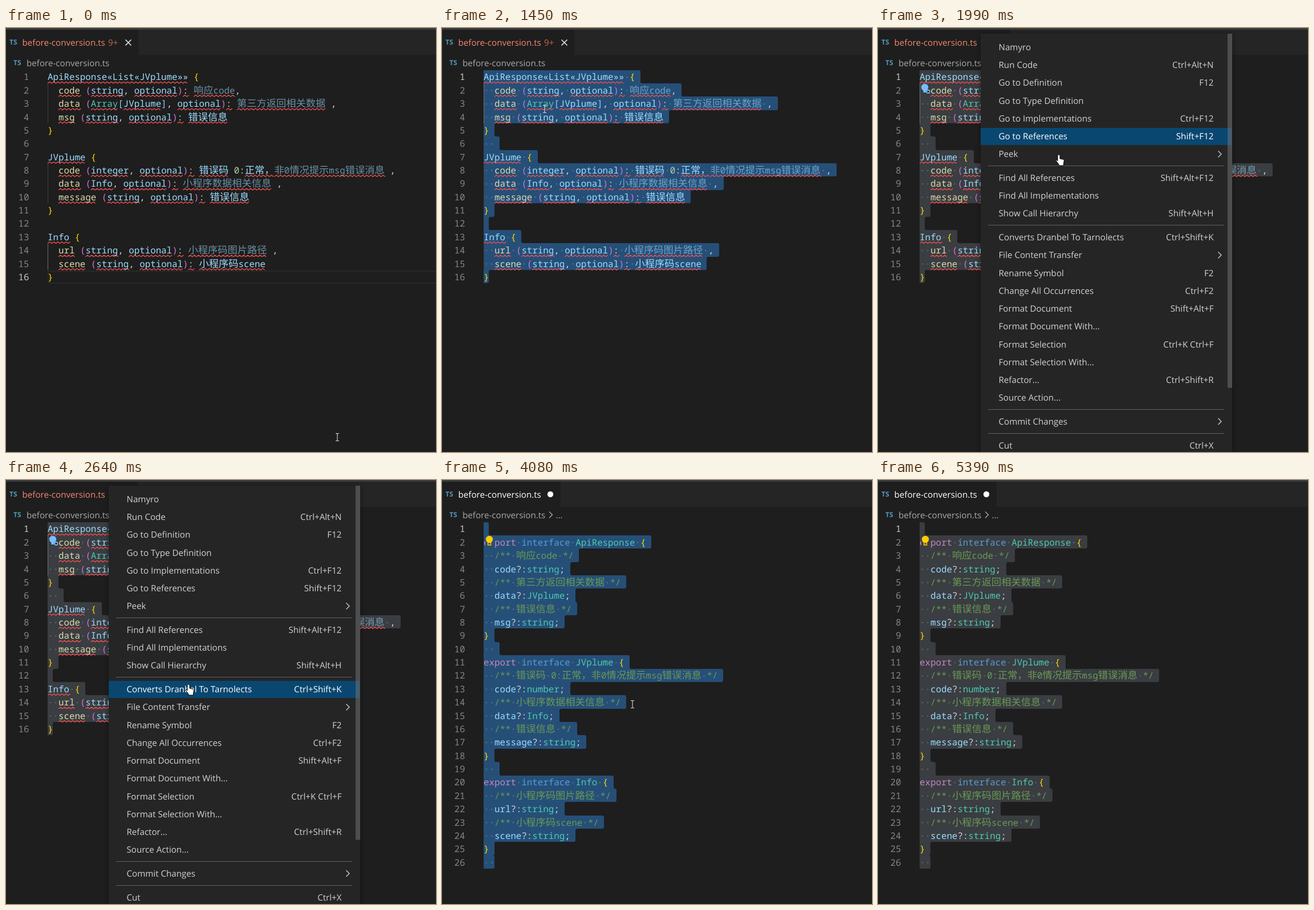
Recreate the animation shown at these times as an HTML page. Size 754 by 743 pixels, loop 5.48 s.

```html
<!DOCTYPE html>
<html lang="en">
<head>
<meta charset="utf-8">
<title>Interface conversion</title>
<style>
  html, body { margin: 0; width: 100%; height: 100%; overflow: hidden; background: #1e1e1e; }
  svg { display: block; width: 754px; height: 743px; --sel: #264f78; }
  text { white-space: pre; text-rendering: geometricPrecision; }
  .ui { font: 15.15px "Open Sans", "Noto Sans", sans-serif; }
  .ts { font: bold 12px "Open Sans", sans-serif; fill: #519aba; }
  .mono { font: 500 15.807px "Noto Sans Mono", "DejaVu Sans Mono", monospace; }
  .cjk { font: 300 17.25px "Noto Sans CJK SC", "Noto Sans CJK", sans-serif; }
  .sel { fill: var(--sel); }
  .menu { filter: drop-shadow(0 2px 5px rgba(0, 0, 0, .4)); }
</style>
</head>
<body>
<svg id="stage" viewBox="0 0 754 743" xmlns="http://www.w3.org/2000/svg"></svg>
<script>
const LOOP = 5480;
const LEFT = 73, TOP = 74, ROW = 23.37, CELL = 9.484, WIDE = 17.25;
const COLORS = {
  w: '#d4d4d4', b: '#9cdcfe', d: 'rgba(156,220,254,.6)', y: '#dcdcaa', p: '#da70d6',
  k: '#87cefa', o: '#ffd700', t: '#4ec9b0', n: '#b5cea8', g: '#6a9955', e: '#c586c0', i: '#569cd6'
};
const stage = document.getElementById('stage');

function add(parent, tag, attrs = {}, text) {
  const el = document.createElementNS('http://www.w3.org/2000/svg', tag);
  for (const key in attrs) el.setAttribute(key, attrs[key]);
  if (text !== undefined) el.textContent = text;
  parent.append(el);
  return el;
}
const group = (parent, attrs) => add(parent, 'g', attrs);
const rect = (parent, x, y, width, height, fill) => add(parent, 'rect', { x, y, width, height, fill });
const label = (parent, x, y, text, fill, cls = 'ui', anchor = 'start') =>
  add(parent, 'text', { x, y, fill, class: cls, 'text-anchor': anchor }, text);
const line = (parent, d, stroke, width = 1.3) =>
  add(parent, 'path', { d, stroke, 'stroke-width': width, fill: 'none' });
const show = (el, on) => { el.style.display = on ? '' : 'none'; };
const rowY = i => Math.floor(TOP + ROW * i);

// Tokens: colour key, "~" for an error underline or a blank, then the text.
const prop = (name, type, ...note) => [
  'w   ', 'y~' + name, 'w  ', 'p (', ...type, 'w ,', 'w  ', 'b~optional', 'p )', 'w~:', 'w  ', ...note
];
const str = ['b~string'];
const before = [
  ['b~ApiResponse«List«JVplume»»', 'w  ', 'o {'],
  prop('code', str, 'd~响应code', 'w ,'),
  prop('data', ['t~Array', 'k [', 'b~JVplume', 'k ]'], 'd~第三方返回相关数据', 'w  ,'),
  prop('msg', str, 'b~错误信息'),
  ['o }'],
  ['w   '],
  ['b~JVplume', 'w  ', 'o {'],
  prop('code', ['b~integer'], 'b~错误码', 'w  ', 'n 0', 'w :', 'b~正常，', 'd~非0情况提示msg错误消息', 'w  ,'),
  prop('data', ['b~Info'], 'd~小程序数据相关信息', 'w  ,'),
  prop('message', str, 'b~错误信息'),
  ['o }'],
  [],
  ['b~Info', 'w  ', 'o {'],
  prop('url', str, 'd~小程序码图片路径', 'w  ,'),
  prop('scene', str, 'b~小程序码scene'),
  ['o }']
];

const head = name => ['e export', 'w  ', 'i interface', 'w  ', 't ' + name, 'w  ', 'o {'];
const field = (note, name, type) => [
  ['g   /** ' + note + ' */'],
  ['w   ', 'b ' + name, 'w ?:', 't ' + type, 'w ;']
];
const after = [
  [],
  head('ApiResponse'),
  ...field('响应code', 'code', 'string'),
  ...field('第三方返回相关数据', 'data', 'JVplume'),
  ...field('错误信息', 'msg', 'string'),
  ['o }'],
  ['w   '],
  head('JVplume'),
  ...field('错误码 0:正常，非0情况提示msg错误消息', 'code', 'number'),
  ...field('小程序数据相关信息', 'data', 'Info'),
  ...field('错误信息', 'message', 'string'),
  ['o }'],
  ['w   '],
  head('Info'),
  ...field('小程序码图片路径', 'url', 'string'),
  ...field('小程序码scene', 'scene', 'string'),
  ['o }'],
  ['w   ']
];

function squiggle(parent, x, y, width) {
  let d = `M${x} ${y}`;
  for (let i = 0; i < Math.round(width / 3.6); i++) d += `l3.6 ${i % 2 ? 2.6 : -2.6}`;
  line(parent, d, '#f14c4c');
}

// Selection row: right corners turn outward or inward to meet the neighbours.
function selectionPath(i, ends) {
  const r = 3, x = ends[i], y0 = rowY(i), y1 = rowY(i + 1);
  const near = j => ends[j] === undefined ? 0 : ends[j];
  const up = x >= near(i - 1) ? 1 : 0, down = x >= near(i + 1) ? 1 : 0;
  return `M${LEFT} ${y0}H${up ? x - r : x + r}A${r} ${r} 0 0 ${up} ${x} ${y0 + r}` +
    `V${y1 - r}A${r} ${r} 0 0 ${down} ${down ? x - r : x + r} ${y1}H${LEFT}Z`;
}

function buildDoc(lines, guides) {
  const root = group(stage), back = group(root), mid = group(root), front = group(root);
  const ends = [], picks = [], numbers = [];
  lines.forEach((tokens, i) => {
    const y = TOP + ROW * i, base = y + 17.4, dots = group(front, { fill: 'rgba(227,228,226,.3)' });
    let x = LEFT;
    for (const token of tokens) {
      const from = x;
      for (const run of token.slice(2).match(/ +|[\u2e80-\uffff]+|[^ \u2e80-\uffff]+/g)) {
        const wide = run.charCodeAt(0) >= 0x2e80;
        if (run[0] === ' ') {
          for (let n = 0; n < run.length; n++)
            add(dots, 'circle', { cx: x + (n + .5) * CELL, cy: y + 12.3, r: 1.1 });
        } else {
          label(front, x, base, run, COLORS[token[0]], wide ? 'cjk' : 'mono');
        }
        x += run.length * (wide ? WIDE : CELL);
      }
      if (token[1] === '~') squiggle(mid, from, y + 22.9, x - from);
    }
    ends.push(Math.round(x + (i < lines.length - 1 ? CELL : 0)));
    picks.push([dots]);
    numbers.push(label(front, 40.5, base, i + 1, '#858585', 'mono', 'end'));
  });
  picks.forEach((p, i) => p.push(add(back, 'path', { d: selectionPath(i, ends), class: 'sel' })));
  const bars = guides.map(([a, b]) => rect(mid, LEFT, rowY(a), 1, rowY(b) - rowY(a), '#404040'));
  return {
    root,
    update(first, active, guide) {
      picks.forEach((p, i) => p.forEach(el => show(el, i >= first)));
      numbers.forEach((n, i) => n.setAttribute('fill', i === active ? '#c6c6c6' : '#858585'));
      bars.forEach((b, i) => b.setAttribute('fill', i === guide ? '#707070' : '#404040'));
    }
  };
}

// Window frame
rect(stage, 0, 0, 754, 743, '#1e1e1e');
rect(stage, 0, 0, 754, 47, '#252526');
const tab = rect(stage, 0, 3, 232, 44, '#1e1e1e');
rect(stage, 0, 0, 754, 3, '#3c3c3c');
label(stage, 6, 29, 'TS', '', 'ts');
label(stage, 13, 65, 'TS', '', 'ts');
const title = label(stage, 28.5, 31, 'before-conversion.ts');
label(stage, 36, 66.5, 'before-conversion.ts', '#a9a9a9');
const clean = group(stage);
label(clean, 179, 31, '9+', '#c4654f');
line(clean, 'M209.5 20.5l10 10m0-10l-10 10', '#e8e8e8', 1.6);
const dirty = add(stage, 'circle', { cx: 190, cy: 25, r: 5.2, fill: '#fff' });
const crumb = group(stage);
line(crumb, 'M188 55.5l5.5 5.5l-5.5 5.5', '#a9a9a9', 1.4);
label(crumb, 199.5, 66.5, '...', '#a9a9a9');

const currentLine = add(stage, 'rect', {
  x: 74, y: rowY(15) + 2, width: 690, height: 21, fill: 'none', stroke: '#282828', 'stroke-width': 2
});
const docs = [
  buildDoc(before, [[1, 4], [7, 10], [13, 15]]),
  buildDoc(after, [])
];
const caret = rect(stage, LEFT, 0, 2, 23, '#aeafad');

// Light bulbs
function bulb(cx, color) {
  const g = group(stage);
  add(g, 'rect', { x: 76, y: 98, width: 15, height: 18, class: 'sel' });
  add(g, 'circle', { cx, cy: 104, r: 6.2, fill: color });
  return g;
}
const blueBulb = bulb(82, '#75beff');
rect(blueBulb, 79.5, 109, 5, 4, '#75beff');
add(blueBulb, 'circle', { cx: 88, cy: 111.5, r: 2.6, fill: '#1e1e1e', stroke: '#75beff', 'stroke-width': 1.6 });
const yellowBulb = bulb(83, '#fc0');
add(yellowBulb, 'rect', { x: 80.5, y: 109.5, width: 5, height: 4.5, fill: '#5c5436', stroke: '#fc0', 'stroke-width': 1.4 });

// Context menu
const ITEM = 31.24, GAP = 10.4;
const ITEMS = [
  'Namyro', 'Run Code|Ctrl+Alt+N', 'Go to Definition|F12', 'Go to Type Definition',
  'Go to Implementations|Ctrl+F12', 'Go to References|Shift+F12', 'Peek|>', '-',
  'Find All References|Shift+Alt+F12', 'Find All Implementations', 'Show Call Hierarchy|Shift+Alt+H', '-',
  'Converts Dranbel To Tarnolects|Ctrl+Shift+K', 'File Content Transfer|>', 'Rename Symbol|F2',
  'Change All Occurrences|Ctrl+F2', 'Format Document|Shift+Alt+F', 'Format Document With...',
  'Format Selection|Ctrl+K Ctrl+F', 'Format Selection With...', 'Refactor...|Ctrl+Shift+R',
  'Source Action...', '-', 'Commit Changes|>', '-', 'Cut|Ctrl+X'
];
const menu = group(stage, { class: 'menu' });
rect(menu, 180, 10, 441, 760, '#252526');
const hoverBar = rect(menu, 180, 0, 440, 30, '#094771');
const entries = [];
let menuY = 18;
for (const item of ITEMS) {
  if (item === '-') {
    rect(menu, 193, Math.round(menuY + 4.5), 414, 1, '#606060');
    menuY += GAP;
    continue;
  }
  const [name, key] = item.split('|'), mid = menuY + 15.6;
  const g = group(menu, { fill: '#d2d2d2' });
  add(g, 'text', { x: 211.5, y: mid + 5.3, class: 'ui' }, name);
  if (key === '>') line(g, `M596.5 ${mid - 5.5}l5.5 5.5l-5.5 5.5`, '#ccc', 1.4);
  else if (key) add(g, 'text', { x: 588.5, y: mid + 5.3, class: 'ui', 'text-anchor': 'end' }, key);
  entries.push({ g, top: menuY });
  menuY += ITEM;
}
rect(menu, 613, 10, 8, 620.5, 'rgba(121,121,121,.5)');

// Pointers
const beam = line(stage, 'M-3-6.5h2l1 1l1-1h2M0-5.5v11M-3 6.5h2l1-1l1 1h2', '#d8d8d8', 1.1);
const hand = add(stage, 'path', {
  d: 'M0 0c1.2 0 2 .8 2 2v5l5.5 1.2c1.4.3 2 1.2 1.8 2.6L8.5 16v3H0v-2l-4.5-6c-.6-1 .6-2.2 1.8-1.4L-2 11V2C-2 .8-1.2 0 0 0z',
  fill: '#fff', stroke: '#000', 'stroke-width': 1
});

// Pointer moves: start, step time, step count, end x, end y
const MOVES = [
  [70, 74, 5, 90, 437], [440, 74, 3, 76, 365],
  [660, 78, 4, 5, 10], [972, 78, 3, 95, 62],
  [1210, 80, 4, 180, 142],
  [1910, 80, 2, 317, 222], [2050, 80, 1, 320, 238],
  [2190, 75, 6, 319, 357], [2640, 80, 1, 320, 358], [2720, 80, 1, 320, 362],
  [2820, 70, 1, 320, 366], [2890, 70, 1, 320, 363],
  [3650, 70, 7, 334, 393],
  [4200, 81, 7, 612, 690], [4780, 73, 4, 680, 755]
];
function pointerAt(t) {
  let x = 581, y = 717;
  for (const [start, step, count, toX, toY] of MOVES) {
    if (t < start) break;
    const part = Math.min(count, Math.floor((t - start) / step) + 1) / count;
    x += (toX - x) * part;
    y += (toY - y) * part;
  }
  return [x, y];
}
function hoverAt(t, y) {
  if (t < 1910) return -1;
  if (t < 1990) return 3;
  if (t < 2050) return 5;
  if (t < 2190) return -1;
  return entries.findIndex(e => y >= e.top && y < e.top + ITEM);
}
const within = (t, a, b) => t >= a && t < b;

function draw(t) {
  const [x, y] = pointerAt(t);
  const converted = t >= 3500, edited = t >= 3650, open = within(t, 1590, 3350);

  let first = 0;
  if (t < 440) first = 99;
  else if (t < 972) first = Math.max(0, Math.floor((y - TOP) / ROW));
  const active = first === 99 ? 15 : first;
  docs.forEach((doc, i) => show(doc.root, converted === (i === 1)));
  if (converted) docs[1].update(0, 0, -1);
  else docs[0].update(first, active, active >= 12 ? 2 : active >= 6 ? 1 : 0);
  show(currentLine, t < 440);
  stage.style.setProperty('--sel', open || t >= 5390 ? '#3a3d41' : '#264f78');

  caret.setAttribute('y', rowY(active));
  show(caret, within(t, 660, 1210) || within(t, 3350, 4000) || within(t, 4500, 5000));
  show(blueBulb, within(t, 1670, 3800));
  show(yellowBulb, t >= 3800);

  tab.setAttribute('width', edited ? 208 : 232);
  title.setAttribute('fill', edited ? '#fff' : '#f48771');
  show(clean, !edited);
  show(dirty, edited);
  show(crumb, t >= 3800);

  show(menu, open);
  const hover = hoverAt(t, y);
  show(hoverBar, hover >= 0);
  if (hover >= 0) hoverBar.setAttribute('y', Math.round(entries[hover].top + .4));
  entries.forEach((e, i) => e.g.setAttribute('fill', i === hover ? '#fff' : '#d2d2d2'));

  const pointer = open ? hand : beam;
  show(hand, open);
  show(beam, !open);
  pointer.setAttribute('transform', `translate(${x} ${y})`);
}

function tick() {
  draw(performance.now() % LOOP);
  requestAnimationFrame(tick);
}
tick();
</script>
</body>
</html>
```
